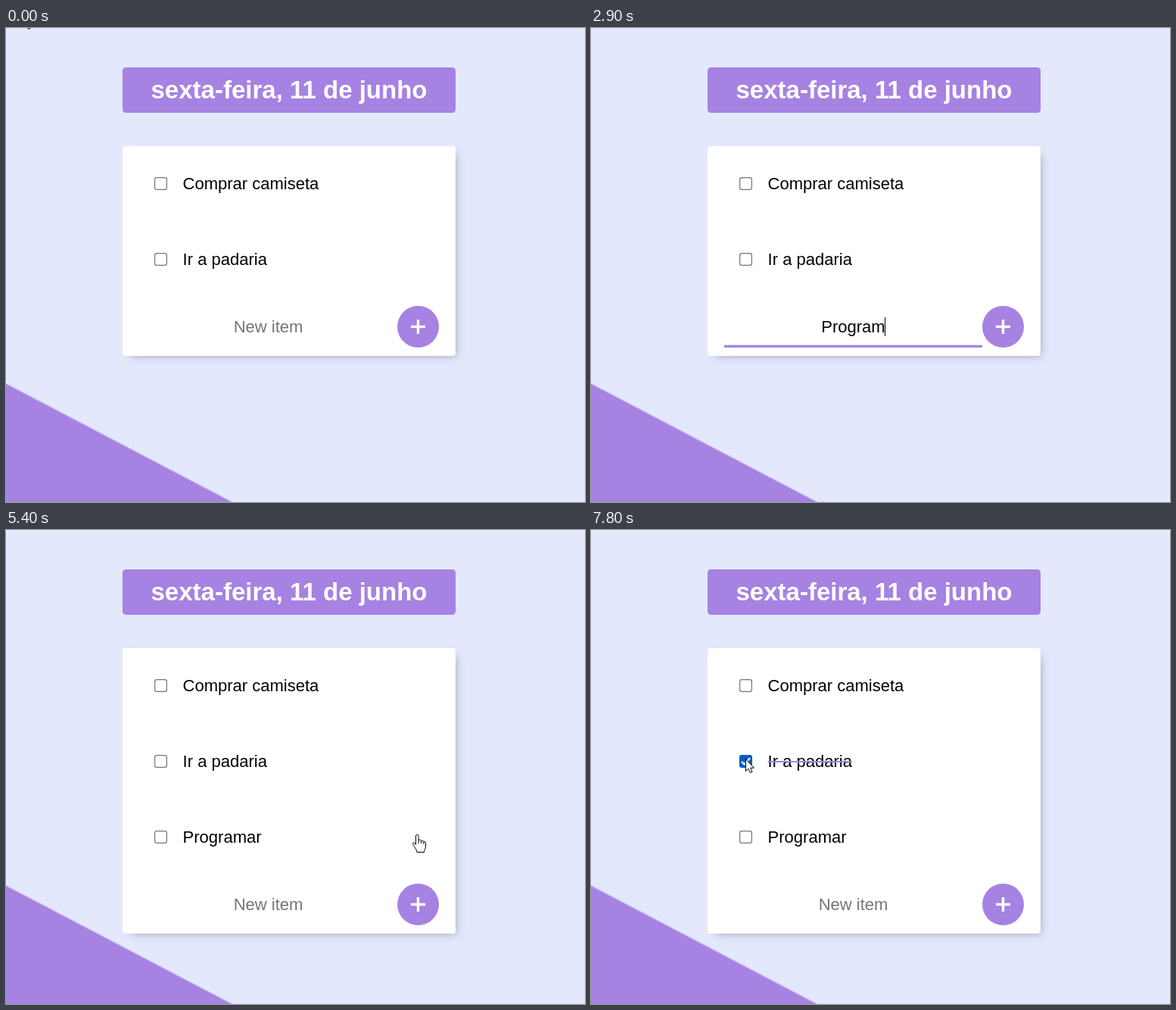
An HTML page with a canvas for the animation above (8 s loop, 765 px wide and 626 px high).

```html
<!DOCTYPE html>
<html lang="pt-BR">
<head>
<meta charset="utf-8">
<title>Lista de tarefas</title>
<style>
html, body { margin: 0; width: 100%; height: 100%; overflow: hidden; background: #e3e8fc; }
canvas { display: block; }
</style>
</head>
<body>
<canvas id="stage" width="765" height="626"></canvas>
<script>
const ctx = document.getElementById('stage').getContext('2d');
const LOOP = 8000, TICK = 100;
const LIGHT = '#e3e8fc', PURPLE = '#a682e2';
const FAMILY = '"Liberation Sans", Arial, sans-serif';
const INPUT = { left: 176, right: 517, mid: 346.5 };

// Moments of the interaction, in ms
const FOCUS = 900, TYPE = 1900, KEY_GAP = 150, WAKE = 3900, BLUR = 4500;
const ADD = 5400, LEAVE = 5500, PRESS = 7700, CHECK = 7800;
const WORD = 'Programar';
const TYPED = TYPE + KEY_GAP * (WORD.length - 1);

// Pointer stops; it eases from each one to the next
const STOPS = [
  { t: 100, x: 22.5, y: -17 },
  { t: 700, x: 380, y: 377 },
  { t: WAKE, x: 380, y: 377 },
  { t: 4300, x: 568, y: 398 },
  { t: BLUR, x: 543, y: 402 },
  { t: LEAVE, x: 543, y: 402 },
  { t: 5900, x: 385, y: 466 },
  { t: 6000, x: 385, y: 466 },
  { t: 6200, x: 294, y: 425 },
  { t: 6900, x: 198, y: 301 },
  { t: 7000, x: 198, y: 301 },
  { t: 7200, x: 204, y: 302 }
];

const ARROW = new Path2D('M.5 .5V16.5L4 13.2L6.4 18.5L9 17.4L6.7 12.2H11.5Z');
const HAND = new Path2D('M-1.5 1.8C-1.5 -.1 2 -.1 2 1.8V7.5C3.5 6.6 5.4 7.2 5.5 8.7' +
  'C7 7.8 8.8 8.4 9 9.8C10.5 9.2 11.5 10 11.5 11.5V16C11.5 19 9.5 20 9.5 23.5H0' +
  'C0 20 -4 16.5 -5.4 12.5C-5.6 10.4 -3.4 10 -2.5 12L-1.5 13.5Z');
const FINGERS = new Path2D('M2 7.5V12M5.5 8.7V12M9 9.8V13');
const IBEAM = new Path2D('M-3 -7.5H-1Q0 -7.5 .5 -6.5Q1 -7.5 2 -7.5H4' +
  'M.5 -6.5V6.5M-3 7.5H-1Q0 7.5 .5 6.5Q1 7.5 2 7.5H4');

const ease = k => k * k * (3 - 2 * k);

function fillRound(x, y, w, h, r, color) {
  ctx.fillStyle = color;
  ctx.beginPath();
  ctx.roundRect(x, y, w, h, r);
  ctx.fill();
}

function text(str, x, y, { size = 22, weight = 400, color = '#000', align = 'left' } = {}) {
  ctx.font = `${weight} ${size}px ${FAMILY}`;
  ctx.fillStyle = color;
  ctx.textAlign = align;
  ctx.fillText(str, x, y);
}

function background() {
  // Soft diagonal edge between the two colours
  const len = Math.hypot(156, 298), nx = -156 / len, ny = 298 / len;
  const g = ctx.createLinearGradient(-nx * 1.5, 470 - ny * 1.5, nx, 470 + ny);
  g.addColorStop(0, LIGHT);
  g.addColorStop(1, PURPLE);
  ctx.fillStyle = g;
  ctx.fillRect(0, 0, 765, 626);
}

function card(height) {
  ctx.save();
  ctx.shadowColor = 'rgba(0,0,0,.3)';
  ctx.shadowBlur = 12;
  ctx.shadowOffsetX = ctx.shadowOffsetY = 5.5;
  fillRound(159.5, 161.5, 429, height - 11, 2, '#fff');
  ctx.restore();
  fillRound(154, 156, 440, height, 4, '#fff');
}

function checkbox(y, state) {
  if (state === 'checked') {
    fillRound(196, y, 17, 17, 3, '#005cc8');
    ctx.strokeStyle = '#fff';
    ctx.lineWidth = 2.4;
    ctx.stroke(new Path2D(`M199 ${y + 9}l3.6 3.6l7.4 -8.4`));
    return;
  }
  const borders = { idle: '#767676', hover: '#4f4f4f', active: '#8d8d8d' };
  fillRound(196, y, 17, 17, 3, borders[state]);
  fillRound(197.2, y + 1.2, 14.6, 14.6, 2, '#fff');
}

function item(label, row, state = 'idle') {
  const x = 233.6, y = 197 + row * 100;
  checkbox(y, state);
  text(label, x, y + 16);
  if (state === 'checked') {
    ctx.fillStyle = PURPLE;
    ctx.fillRect(x, y + 8, ctx.measureText(label).width, 2);
  }
}

function typedText(t) {
  if (t < TYPE || t >= ADD) return '';
  return WORD.slice(0, Math.floor((t - TYPE) / KEY_GAP) + 1);
}

function caretVisible(t) {
  if (t < FOCUS || t >= BLUR) return false;
  if (t >= TYPE && t < TYPED) return true;
  const since = t < TYPE ? FOCUS : TYPED;
  return Math.floor((t - since) / 500) % 2 === 0;
}

function form(t, dy) {
  const typed = typedText(t), y = 402 + dy;
  if (typed) text(typed, INPUT.mid, y, { align: 'center' });
  else text('New item', INPUT.mid, y, { align: 'center', color: '#757575' });

  if (t >= FOCUS && t < BLUR) {
    ctx.fillStyle = PURPLE;
    ctx.fillRect(INPUT.left, 418.7 + dy, INPUT.right - INPUT.left, 3.3);
  }
  if (caretVisible(t)) {
    const w = ctx.measureText(typed).width;
    ctx.fillStyle = '#000';
    ctx.fillRect(Math.round(INPUT.mid - w / 2) + Math.floor(w), 382 + dy, 1, 25);
  }

  fillRound(517, 367 + dy, 55, 55, 27.5, PURPLE);
  ctx.fillStyle = '#fff';
  ctx.fillRect(535, 392.8 + dy, 19, 3.4);
  ctx.fillRect(542.8, 385 + dy, 3.4, 19);
}

function pointerAt(t) {
  const i = STOPS.findIndex(s => s.t > t);
  if (i < 1) return STOPS.at(i);
  const a = STOPS[i - 1], b = STOPS[i];
  const k = ease((t - a.t) / (b.t - a.t));
  return { x: a.x + (b.x - a.x) * k, y: a.y + (b.y - a.y) * k };
}

function pointerKind(t, { x, y }, dy) {
  // The shape stays until the pointer moves, even if the page shifts
  const shift = t <= LEAVE ? 0 : dy;
  if (Math.hypot(x - 544.5, y - 394.5 - shift) < 27.5) return 'hand';
  const inInput = x >= INPUT.left && x < INPUT.right && y >= 367 + shift && y < 422 + shift;
  return inInput ? 'ibeam' : 'arrow';
}

function pointer(t, pos, dy) {
  if (t >= TYPE && t < WAKE) return;
  const kind = pointerKind(t, pos, dy);
  ctx.save();
  ctx.translate(Math.round(pos.x), Math.round(pos.y));
  ctx.lineWidth = 1;
  ctx.strokeStyle = '#000';
  ctx.fillStyle = '#fff';
  if (kind === 'ibeam') {
    ctx.stroke(IBEAM);
  } else {
    const shape = kind === 'hand' ? HAND : ARROW;
    ctx.fill(shape);
    ctx.stroke(shape);
    if (kind === 'hand') ctx.stroke(FINGERS);
  }
  ctx.restore();
}

function draw(t) {
  const added = t >= ADD, dy = added ? 100 : 0;
  const pos = pointerAt(t);
  const over = pos.x >= 196 && pos.x < 213 && pos.y >= 297 && pos.y < 314;
  const state = t >= CHECK ? 'checked' : t >= PRESS ? 'active' : over ? 'hover' : 'idle';

  background();
  fillRound(154, 52, 440, 60, 4.5, PURPLE);
  text('sexta-feira, 11 de junho', 374, 93, { size: 33, weight: 700, color: '#fff', align: 'center' });
  card(277 + dy);
  item('Comprar camiseta', 0);
  item('Ir a padaria', 1, state);
  if (added) item(WORD, 2);
  form(t, dy);
  pointer(t, pos, dy);
}

const start = performance.now();
function loop() {
  const t = (performance.now() - start) % LOOP;
  draw(Math.floor(t / TICK) * TICK);
  requestAnimationFrame(loop);
}
loop();
</script>
</body>
</html>
```
